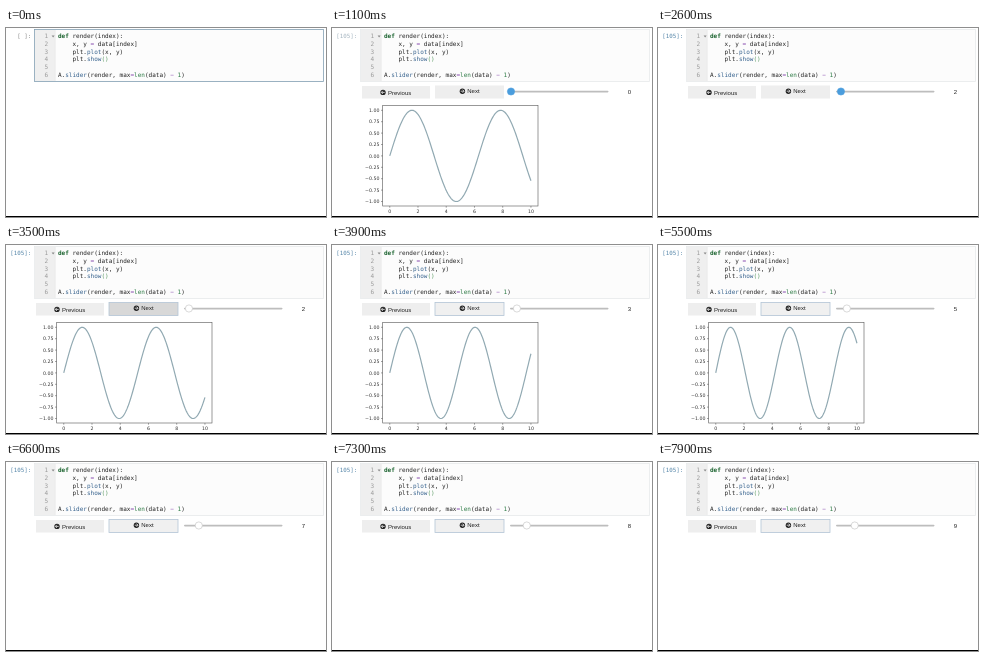
Write an HTML page that moves like this. It is 320 px wide and 189 px high and loops after 8000 ms.

```html
<!DOCTYPE html>
<html lang="en">
<head>
<meta charset="utf-8">
<title>Slider plot</title>
<style>
  html, body { margin: 0; width: 100%; height: 100%; overflow: hidden; background: #fff; }
  svg { display: block; width: 100%; height: 100%; }
  text { white-space: pre; }
  .code { font: 6.03px "DejaVu Sans Mono", monospace; fill: #222; }
  .num { fill: #999; text-anchor: end; }
  .key { fill: #1c6430; font-weight: bold; }
  .fn { fill: #34608c; }
  .lit { fill: #2c7a44; }
  .op { fill: #8a4fb0; }
  .match { fill: #5a9a62; }
  .ui { font: 6px "Liberation Sans", Arial, sans-serif; fill: #222; }
  .tick { font: 4.7px "DejaVu Sans", sans-serif; fill: #333; }
</style>
</head>
<body>
<svg viewBox="0 0 320 189" preserveAspectRatio="none">
  <rect width="320" height="189" fill="#fff"/>
  <rect y="188" width="320" height="1" fill="#000"/>
  <rect id="cell" x="28.5" y="1.5" width="289" height="52" fill="#fcfcfc" stroke-width=".8"/>
  <rect x="29" y="2" width="20" height="51" fill="#efefef"/>
  <path d="M49.2 2V53" stroke="#e2e2e2" stroke-width=".6"/>
  <path d="M45.6 7.4h3l-1.5 2z" fill="#888"/>
  <text id="prompt" class="code" x="25.2" y="10.2" text-anchor="end" style="font-size:5.8px"></text>
  <g id="code"></g>
  <g id="widgets">
    <rect x="30" y="58" width="68" height="12.5" fill="#eee"/>
    <rect id="next" x="103" y="57.5" width="69" height="13" stroke-width=".8"/>
    <g id="labels"></g>
    <rect x="178" y="62.8" width="98.5" height="1.6" rx=".8" fill="#bdbdbd"/>
    <circle id="knob" cy="63.5" r="3.6" stroke-width=".6"/>
    <text id="value" class="ui" x="297.5" y="66.2" text-anchor="middle"></text>
  </g>
  <g id="plot">
    <g id="axes"></g>
    <path id="curve" fill="none" stroke="#91a9b2" stroke-width="1.2" stroke-linejoin="round"/>
    <rect x="50.7" y="77.6" width="155.3" height="100.4" fill="none" stroke="#555" stroke-width=".6"/>
  </g>
</svg>
<script>
const LOOP = 8000;
const $ = id => document.getElementById(id);

function set(el, attrs) {
  for (const k in attrs) el.setAttribute(k, attrs[k]);
  return el;
}

function add(parent, tag, attrs, text = '') {
  const el = set(document.createElementNS('http://www.w3.org/2000/svg', tag), attrs);
  el.textContent = text;
  return parent.appendChild(el);
}

// Code listing: each line is a list of [text, class] spans
const lines = [
  [['def', 'key'], [' render(index):']],
  [['    x, y '], ['=', 'op'], [' data[index]']],
  [['    plt.'], ['plot', 'fn'], ['(x, y)']],
  [['    plt.'], ['show', 'fn'], ['()', 'match']],
  [],
  [['A.'], ['slider', 'fn'], ['(render, max'], ['=', 'op'], ['len', 'lit'],
    ['(data) '], ['−', 'op'], [' '], ['1', 'lit'], [')']]
];
lines.forEach((spans, i) => {
  const y = 10.2 + 7.76 * i;
  add($('code'), 'text', { class: 'code num', x: 42, y }, i + 1);
  const line = add($('code'), 'text', { class: 'code', x: 52, y });
  for (const [text, cls = ''] of spans) add(line, 'tspan', { class: cls }, text);
});

function label(x, y, dir, text) {
  const g = add($('labels'), 'g', { transform: `translate(${x} ${y})` });
  add(g, 'circle', { r: 2.7, fill: '#222' });
  add(g, 'path', {
    d: 'M-1.7 0H1.6M.1-1.6L1.7 0L.1 1.6', transform: `scale(${dir} 1)`,
    fill: 'none', stroke: '#eee', 'stroke-width': .8
  });
  add(g, 'text', { class: 'ui', x: 4.9, y: 2.2 }, text);
}
label(51, 64.4, -1, 'Previous');
label(130.4, 63.2, 1, 'Next');

const px = x => 57.75 + 14.12 * x;
const py = y => 127.9 - 45.6 * y;
const tickLine = d => add($('axes'), 'path', { d, stroke: '#444', 'stroke-width': .5 });

for (let v = -1; v <= 1; v += .25) {
  tickLine(`M49 ${py(v)}H50.7`);
  add($('axes'), 'text', { class: 'tick', x: 47.4, y: py(v) + 1.7, 'text-anchor': 'end' },
    v.toFixed(2).replace('-', '−'));
}
for (let v = 0; v <= 10; v += 2) {
  tickLine(`M${px(v)} 178V179.7`);
  add($('axes'), 'text', { class: 'tick', x: px(v), y: 185.2, 'text-anchor': 'middle' }, v);
}

function wave(index) {
  const pts = [];
  for (let x = 0; x <= 10.001; x += .05) {
    pts.push(px(x).toFixed(2) + ' ' + py(Math.sin(x * (1 + index / 10))).toFixed(2));
  }
  return 'M' + pts.join('L');
}

// [start time, value]; a null plot means the output is cleared
const values = [[0, 0], [1700, 1], [1900, 2], [3600, 3], [4400, 4], [5100, 5],
  [5900, 6], [6600, 7], [7300, 8], [7900, 9]];
const plots = [[0, null], [600, 0], [2600, null], [2900, 1], [3000, 2], [3600, null], [3900, 3],
  [4400, null], [4700, 4], [5100, null], [5500, 5], [5900, null], [6200, 6],
  [6600, null], [7000, 7], [7300, null], [7700, 8], [7900, null]];
const at = (track, t) => track.filter(k => k[0] <= t).pop()[1];
const within = (t, a, b) => t >= a && t < b;
const show = (id, on) => set($(id), { visibility: on ? 'visible' : 'hidden' });

function update(t) {
  const idle = t < 100;
  const value = at(values, t);
  const index = at(plots, t);
  const focused = t >= 3500;
  const pressed = within(t, 3500, 3600) || within(t, 5000, 5100);
  const blue = within(t, 1100, 3500);

  set($('cell'), { stroke: idle ? '#83a0b3' : '#e8eaeb' });
  $('prompt').textContent = idle ? '[ ]:' : t < 600 ? '[*]:' : '[105]:';
  $('prompt').style.fill = idle ? '#888' : t < 1700 ? '#a3b3bf' : '#5485a8';

  show('widgets', t >= 200);
  set($('next'), {
    fill: pressed ? '#d8d8d8' : focused ? '#f0f0f0' : '#eee',
    stroke: focused ? '#b3c5d6' : 'none'
  });
  set($('knob'), {
    cx: 179 + 1.97 * value,
    fill: blue ? '#4a9ddd' : '#fff',
    stroke: blue ? '#4a9ddd' : '#c2c2c2'
  });
  $('value').textContent = value;

  show('plot', index !== null);
  if (index !== null) set($('curve'), { d: wave(index) });
}

const start = performance.now();
function frame() {
  update((performance.now() - start) % LOOP);
  requestAnimationFrame(frame);
}
frame();
</script>
</body>
</html>
```
